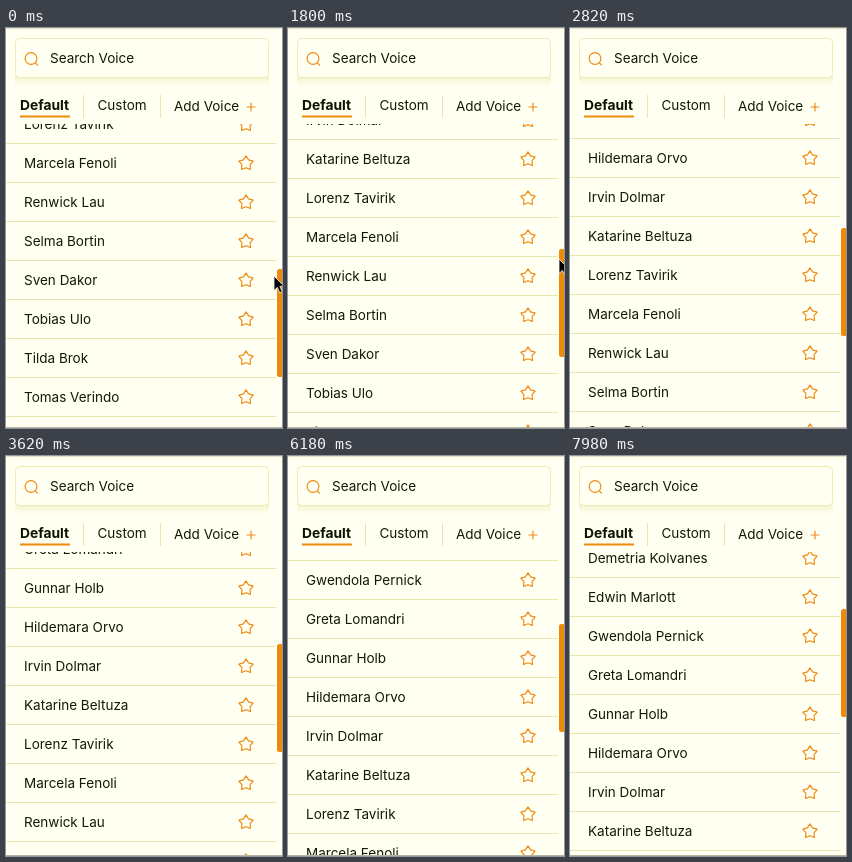
These frames come from a looping animation (276 px wide and 400 px high, 8000 ms). An HTML page:

```html
<!DOCTYPE html>
<html lang="en">
<head>
<meta charset="utf-8">
<title>Voice list</title>
<style>
  html, body { margin: 0; width: 100%; height: 100%; overflow: hidden; background: #fffff2; }
  svg { display: block; width: 276px; height: 400px; font: 13.5px Inter, Roboto, sans-serif; fill: #141a00; }
  .bold { font-size: 13.8px; font-weight: 700; fill: #0c1200; }
  .accent { fill: none; stroke: #ee8a14; stroke-width: 1.15; stroke-linejoin: round; stroke-linecap: round; }
  .rule { fill: none; stroke: #e8e6ae; }
  .fill { fill: #ee8a0a; }
</style>
</head>
<body>
<svg viewBox="0 0 276 400">
  <defs>
    <clipPath id="view"><rect y="96" width="276" height="304"/></clipPath>
    <linearGradient id="shade" x2="0" y2="1">
      <stop stop-color="#f0f0c2"/>
      <stop offset="1" stop-color="#fffff2"/>
    </linearGradient>
    <path id="star" class="accent"/>
  </defs>

  <g clip-path="url(#view)"><g id="list"></g></g>
  <rect id="thumb" class="fill" x="271" width="6" height="108" rx="2.5"/>

  <path d="M0 .5H276" stroke="#e4e3c6"/>
  <path d="M0 399.5H276" stroke="#b4b3a0"/>
  <rect x="9" y="46" width="254" height="12" rx="4" fill="url(#shade)"/>
  <rect x="9.5" y="10.5" width="253" height="39" rx="4" fill="#fffff2" stroke="#ecebba"/>
  <circle class="accent" cx="25" cy="30.5" r="5.9"/>
  <path class="accent" d="M29.4 34.9l2.2 2.2"/>
  <text x="44" y="35">Search Voice</text>

  <text class="bold" x="14" y="82">Default</text>
  <rect class="fill" x="14" y="87.5" width="50" height="2"/>
  <path class="rule" d="M77.5 67V90M154.5 67V90"/>
  <text x="91.5" y="82">Custom</text>
  <text x="168" y="83">Add Voice</text>
  <path class="accent" d="M241 79H249M245 75V83"/>

  <path id="cursor" d="M0 0V14.5L3.4 11.4L5.7 16.8L8.2 15.7L5.9 10.4H10.4Z" fill="#000" stroke="#fff" stroke-width=".8"/>
</svg>
<script>
const LOOP = 8000, ROW = 39, THUMB_LAG = 50;
const names = [
  "Demetria Kolvanes", "Edwin Marlott", "Gwendola Pernick", "Greta Lomandri",
  "Gunnar Holb", "Hildemara Orvo", "Irvin Dolmar", "Katarine Beltuza",
  "Lorenz Tavirik", "Marcela Fenoli", "Renwick Lau", "Selma Bortin",
  "Sven Dakor", "Tobias Ulo", "Tilda Brok", "Tomas Verindo"
];

// Keyframes: [time in ms, value]. The list is dragged in strokes with slower stretches between.
const listY = [
  [0, -216], [700, -175], [1800, -142], [2820, -65], [3620, -24], [4180, -7],
  [4920, 0], [5020, 13], [5400, 38], [6180, 46], [6700, 93], [7440, 102]
];
const cursorX = [[0, 268], [1800, 271], [2500, 279]];
const cursorY = [[0, 248], [700, 240], [1800, 231], [2500, 216]];

const byId = id => document.getElementById(id);
const list = byId("list"), thumb = byId("thumb"), cursor = byId("cursor");

const starPoints = Array.from({ length: 10 }, (_, i) => {
  const angle = i * Math.PI / 5, radius = i % 2 ? 4.3 : 7.5;
  return `${(radius * Math.sin(angle)).toFixed(2)} ${(0.4 - radius * Math.cos(angle)).toFixed(2)}`;
});
byId("star").setAttribute("d", `M${starPoints.join("L")}Z`);

list.innerHTML = names.map((name, i) => `
  <g transform="translate(0 ${i * ROW})">
    <text x="18" y="5">${name}</text>
    <use href="#star" x="240"/>
    <path class="rule" d="M0 19.5H270"/>
  </g>`).join("");

// Slope of the segment that starts at key i.
function slope(keys, i) {
  if (i < 0 || i > keys.length - 2) return 0;
  return (keys[i + 1][1] - keys[i][1]) / (keys[i + 1][0] - keys[i][0]);
}

// Speed at key i: the harmonic mean keeps the curve monotone.
function speed(keys, i) {
  const before = slope(keys, i - 1), after = slope(keys, i);
  if (i === 0) return after;
  return before * after > 0 ? 2 * before * after / (before + after) : 0;
}

function valueAt(keys, t) {
  const next = keys.findIndex(([time]) => time > t);
  if (next < 0) return keys[keys.length - 1][1];
  if (next === 0) return keys[0][1];
  const [t0, v0] = keys[next - 1], [t1, v1] = keys[next];
  const span = t1 - t0, u = (t - t0) / span, w = 1 - u;
  return v0 * w * w * (1 + 2 * u) + v1 * u * u * (1 + 2 * w)
    + span * u * w * (w * speed(keys, next - 1) - u * speed(keys, next));
}

// The picture holds for 20, 100 and 20 ms in turn.
function stepTime(t) {
  const phase = t % 140;
  return t - phase + (phase < 20 ? 0 : phase < 120 ? 20 : 120);
}

const moveTo = (element, x, y) =>
  element.setAttribute("transform", `translate(${Math.round(x)} ${Math.round(y)})`);

function draw(now) {
  const t = stepTime(now % LOOP);
  moveTo(list, 0, valueAt(listY, t));
  moveTo(thumb, 0, 181 - 0.277 * valueAt(listY, t - THUMB_LAG));
  moveTo(cursor, valueAt(cursorX, t), valueAt(cursorY, t));
}

const start = performance.now();
function tick() {
  draw(performance.now() - start);
  requestAnimationFrame(tick);
}
tick();
</script>
</body>
</html>
```
